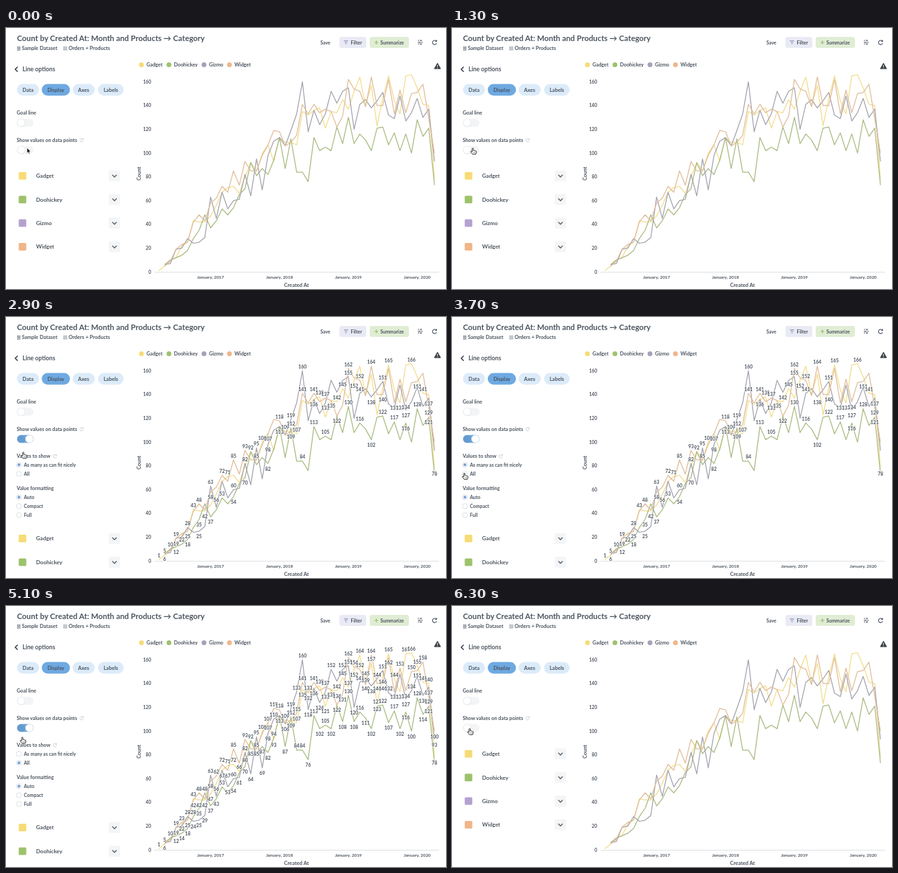
These frames come from a looping animation (640x380 px, 6.4 s). An HTML page:

```html
<!DOCTYPE html>
<html lang="en">
<head>
<meta charset="utf-8">
<title>Line options</title>
<style>
html, body { margin: 0; width: 100%; height: 100%; overflow: hidden; background: #fff; }
svg { display: block; width: 640px; height: 380px; }
text { font-family: Lato, "Open Sans", sans-serif; font-weight: 700; fill: #4c5560; }
</style>
</head>
<body>
<svg id="stage" viewBox="0 0 640 380"></svg>
<script>
const LOOP = 6400;
const stage = document.getElementById('stage');

function add(parent, tag, attrs = {}, content) {
  const node = document.createElementNS('http://www.w3.org/2000/svg', tag);
  for (const key in attrs) node.setAttribute(key, attrs[key]);
  if (content !== undefined) node.textContent = content;
  parent.appendChild(node);
  return node;
}
const group = (parent = stage) => add(parent, 'g');
const text = (parent, x, y, size, content, fill = '#4c5560', more = {}) =>
  add(parent, 'text', { x, y, 'font-size': size, fill, ...more }, content);
const rect = (parent, x, y, width, height, rx, fill) =>
  add(parent, 'rect', { x, y, width, height, rx, fill });
const circle = (parent, cx, cy, r, fill, more = {}) =>
  add(parent, 'circle', { cx, cy, r, fill, ...more });
const stroke = (parent, d, color, width = 1, more = {}) =>
  add(parent, 'path', { d, fill: 'none', stroke: color, 'stroke-width': width, 'stroke-linejoin': 'round', ...more });
const middle = { 'text-anchor': 'middle' };
const show = (node, on) => node.setAttribute('display', on ? 'inline' : 'none');

// Monthly counts; a negative sign puts the value label under its point.
const series = [
  { name: 'Gadget', first: 0, swatch: '#f6db76', line: '#f2dc8e', dot: 197, data: [
    1, 5, 10, -12, -22, -25, 43, -42, -42, -47, -56, -67, 71, 72, 66, -80, 92, -85, 100, 107, -93, -113, 109, -109, 107,
    -135, -132, -136, 138, -121, -135, -134, 145, 137, -152, 164, -140, 157, -123, -146, 165, 144, -133, 165, 166, 155, 141, 140, -78] },
  { name: 'Widget', first: 1, swatch: '#efb68a', line: '#e0bc98', dot: 325, data: [
    5, 9, 19, 23, -25, -42, 48, -43, -58, 62, 72, -67, 85, -73, 93, -85, 85, 98, -107, 119, 118, -106, -109, 115,
    141, 133, 141, 134, 137, -135, -122, -131, 162, 154, 152, 139, 164, -140, -140, -162, -133, 153, -134, 150, -151, 158, -129, -100] },
  { name: 'Gizmo', first: 1, swatch: '#b3a2cf', line: '#a3a2ae', dot: 288, data: [
    -6, 7, -19, 20, 28, -24, -25, -29, 63, 45, 67, -53, 60, -61, 82, -64, 95, -69, -98, 110, -113, -106, 119, 133,
    160, -118, -136, -124, -133, 152, -142, 152, 155, -120, 141, 145, -138, 144, 151, 132, -129, 148, -127, 134, 146, -130, -137, -93] },
  { name: 'Doohickey', first: 1, swatch: '#9dc26c', line: '#a8ba80', dot: 237, data: [
    6, 10, -12, -14, -18, 28, -35, 48, -37, -43, 53, 48, -54, 65, -70, 92, 81, -87, -82, 94, 113, -87, 112, 84,
    84, -76, 113, -102, 105, -102, -122, -108, 130, -108, 116, -111, -102, 121, 122, -107, 117, -102, -116, -100, 128, -114, -121, 73] }
];
const rows = [series[0], series[3], series[2], series[1]];
const monthX = i => 222.4 + 8.35 * i;
const countY = v => 355 - 1.729 * Math.abs(v);

function drawHeader() {
  text(stage, 16, 18.5, 11.3, 'Count by Created At: Month and Products → Category', '#454d57');
  for (let k = 0; k < 3; k++) rect(stage, 16, 27 + k * 2.1, 5.2, 1.5, .5, '#8a929b');
  text(stage, 23, 32.4, 7.45, 'Sample Dataset', '#8a929b');
  for (let k = 0; k < 9; k++) rect(stage, 83.5 + k % 3 * 2, 27 + Math.floor(k / 3) * 2, 1.4, 1.4, 0, '#8a929b');
  text(stage, 91, 32.4, 7.45, 'Orders + Products', '#8a929b');
  text(stage, 464.5, 23.6, 7, 'Save', '#6fa3d6', middle);
  rect(stage, 485, 13, 39, 16, 3, '#e9eaf4');
  stroke(stage, 'M491.5 18.7h6M492.8 21h3.4M493.8 23.2h1.4', '#8384b5', 1.1);
  text(stage, 501.5, 23.6, 7, 'Filter', '#8384b5');
  rect(stage, 529, 13, 57, 16, 3, '#e0edd4');
  stroke(stage, 'M536 21h5.4M538.7 18.3v5.4', '#93bf6c', 1.2);
  text(stage, 544.5, 23.6, 7, 'Summarize', '#93bf6c');
  stroke(stage, 'M599.3 18.2h1.4M602 18.2h3M599.3 20.8h4M604.3 20.8h1.6M599.3 23.4h1.4M602 23.4h3', '#4c5560', 1.3);
  stroke(stage, 'M625.9 19.1a3.1 3.1 0 1 0 .5 3', '#4c5560', 1.1);
  add(stage, 'path', { d: 'M626.9 17v3.1h-3.1z', fill: '#4c5560' });
  add(stage, 'path', { d: 'M627.6 51.2l4.5 8h-9z', fill: '#3e434a', stroke: '#3e434a', 'stroke-linejoin': 'round' });
  stroke(stage, 'M627.6 53.8v2.8M627.6 57.6v1', '#fff', 1);
}

function drawChart() {
  for (const s of series) {
    circle(stage, s.dot, 53.5, 3.5, s === series[2] ? '#a5a1b9' : s.swatch);
    text(stage, s.dot + 7.2, 56, 7.3, s.name);
  }
  for (let v = 0; v <= 160; v += 20)
    text(stage, 211, countY(v) + 2.5, 6.6, v, '#858d96', { 'text-anchor': 'end' });
  stroke(stage, 'M216 355.5H630', '#dfe1e3', 1);
  for (let k = 0; k < 4; k++)
    text(stage, monthX(9 + 12 * k), 365, 6.3, `January, ${2017 + k}`, '#858d96', middle);
  text(stage, 422.5, 377.3, 7.6, 'Created At', '#858d96', middle);
  text(stage, 0, 0, 7.4, 'Count', '#858d96', { ...middle, transform: 'translate(195.5 212) rotate(-90)' });
  for (const s of rows) {
    const points = s.data.map((v, k) => `${monthX(k + s.first).toFixed(1)},${countY(v).toFixed(1)}`);
    add(stage, 'polyline', { points: points.join(' '), fill: 'none', stroke: s.line, 'stroke-width': 1.25, 'stroke-linejoin': 'round' });
  }
}

// Labels that would touch another one in the same month are dropped.
function drawLabels(everyPoint) {
  const layer = group();
  const quiet = [14, 20, 26, 36, 38];
  for (let month = 0; month < 49; month++) {
    const taken = [];
    for (const s of series) {
      const k = month - s.first;
      if (k < 0 || !everyPoint && (k % 2 || quiet.includes(month))) continue;
      const v = s.data[k];
      const y = countY(v) + (v < 0 ? 8 : -5.8);
      if (taken.some(other => Math.abs(other - y) < 9.5)) continue;
      taken.push(y);
      text(layer, monthX(month), y + 2.4, 6.9, Math.abs(v), '#41464d',
        { ...middle, stroke: '#fff', 'stroke-width': 1.6, 'stroke-opacity': .75, 'paint-order': 'stroke' });
    }
  }
  return layer;
}

function drawToggle(y) {
  const track = rect(stage, 16, y - 5.8, 24, 11.6, 5.8, '#f3f4f5');
  circle(stage, 22, y + .6, 5.9, '#000', { opacity: .07 });
  const knob = circle(stage, 22, y, 5.6, '#fff', { stroke: '#e6e8ea', 'stroke-width': .7 });
  return on => {
    track.setAttribute('fill', `rgb(${243 - 135 * on},${244 - 77 * on},${245 - 22 * on})`);
    knob.setAttribute('cx', 22 + 12 * on);
  };
}

function drawReload(parent, x, y) {
  stroke(parent, `M${x + 2} ${y - 1.2}a2.4 2.4 0 1 0 .3 2`, '#c9ced3', .9);
  add(parent, 'path', { d: `M${x + 2.8} ${y - 3}v2.5h-2.5z`, fill: '#c9ced3' });
}

function drawRadio(parent, y, label) {
  circle(parent, 18.8, y, 3.7, '#fff', { stroke: '#d5d9dd', 'stroke-width': .8 });
  const dot = circle(parent, 18.8, y, 2.1, '#74a5d8');
  const caption = text(parent, 26, y + 2.5, 7, label);
  return on => {
    show(dot, on);
    caption.setAttribute('fill', on ? '#93aace' : '#4c5560');
  };
}

function drawSidebar() {
  stroke(stage, 'M17 56.5l-3.6 3.6 3.6 3.6', '#3e454d', 1.5);
  text(stage, 24, 63, 8.7, 'Line options');
  [['Data', 16, 32], ['Display', 52, 41], ['Axes', 97, 32], ['Labels', 134, 37]].forEach(([label, x, w], k) => {
    rect(stage, x, 81.5, w, 17, 8.5, k === 1 ? '#6ea9e2' : '#dcebf9');
    text(stage, x + w / 2, 92.6, 7.5, label, k === 1 ? '#fff' : '#6ba5df', middle);
  });
  text(stage, 15.5, 126.4, 7.3, 'Goal line');
  text(stage, 15.5, 165.6, 7.3, 'Show values on data points');
  drawReload(stage, 110, 163.3);
  drawToggle(138)(0);
}

function drawOptions() {
  const layer = group();
  text(layer, 15.5, 204.8, 7.3, 'Values to show');
  drawReload(layer, 71, 202.5);
  text(layer, 15.5, 252.2, 7.3, 'Value formatting');
  const fit = drawRadio(layer, 215.2, 'As many as can fit nicely');
  const all = drawRadio(layer, 228.4, 'All');
  drawRadio(layer, 262.4, 'Auto')(true);
  drawRadio(layer, 275.4, 'Compact')(false);
  drawRadio(layer, 288.4, 'Full')(false);
  return { layer, fit, all };
}

function drawRows() {
  const layer = group();
  rows.forEach((s, k) => {
    const y = 215.3 + 34.4 * k;
    rect(layer, 18.5, y - 5.5, 11, 11, 1.5, s.swatch);
    text(layer, 43.8, y + 2.8, 8, s.name);
    rect(layer, 149.5, y - 8, 16.5, 16, 2.5, '#f4f5f6');
    stroke(layer, `M154.6 ${y - 1.5}l3.2 3.2 3.2-3.2`, '#5a626b', 1.4);
  });
  return layer;
}

function drawCursor() {
  const layer = group();
  const ink = { stroke: '#fff', 'stroke-width': .8, 'stroke-linejoin': 'round' };
  const arrow = add(layer, 'path', { d: 'M-.6-4.8v8.2l1.9-1.7 1.3 2.9 1.4-.6-1.3-2.9h2.5z', fill: '#111', ...ink });
  const hand = group(layer);
  add(hand, 'path', {
    d: 'M-1.7-3.6q.9-1.2 1.8 0V-.5q.9-.6 1.5.2q1-.4 1.4.4q1.3-.3 1.4.8v1.8l-1 2.2H-1L-3.7 1.4q-.2-1.3 1-.9l1 .8z',
    fill: '#fff', stroke: '#222', 'stroke-width': .9, 'stroke-linejoin': 'round'
  });
  stroke(hand, 'M.3 1.6v1.8M1.6 1.6v1.8M2.9 1.6v1.8', '#333', .45);
  return { layer, arrow, hand };
}

drawHeader();
drawSidebar();
drawChart();
const fitLabels = drawLabels(false);
const allLabels = drawLabels(true);
const setValues = drawToggle(177.5);
const options = drawOptions();
const list = drawRows();
const cursor = drawCursor();

const clamp = v => Math.max(0, Math.min(1, v));
const ease = v => v * v * (3 - 2 * v);
const progress = (t, from, to) => ease(clamp((t - from) / (to - from)));

// Each stop: departure, arrival, x, y.
const stops = [[0, 0, 31, 179], [2500, 3400, 18.8, 231.5], [4700, 5300, 26.5, 182.5], [6300, 6400, 31, 179]];
const OPEN = 1500, ALL = 4000, CLOSE = 5800;

function render(t) {
  let [, , x, y] = stops[0];
  for (const [from, to, toX, toY] of stops.slice(1)) {
    const p = progress(t, from, to);
    x += (toX - x) * p;
    y += (toY - y) * p;
  }
  cursor.layer.setAttribute('transform', `translate(${x.toFixed(2)} ${y.toFixed(2)})`);
  show(cursor.arrow, t < 900);
  show(cursor.hand, t >= 900);

  const open = t >= OPEN && t < CLOSE;
  const all = t >= ALL;
  setValues(progress(t, OPEN, OPEN + 200) - progress(t, CLOSE, CLOSE + 200));
  show(options.layer, open);
  options.fit(!all);
  options.all(all);
  list.setAttribute('transform', `translate(0 ${open ? 107.3 : 0})`);
  show(fitLabels, open && !all);
  show(allLabels, open && all);
}

const start = performance.now();
function tick() {
  render((performance.now() - start) % LOOP);
  requestAnimationFrame(tick);
}
render(0);
requestAnimationFrame(tick);
</script>
</body>
</html>
```
